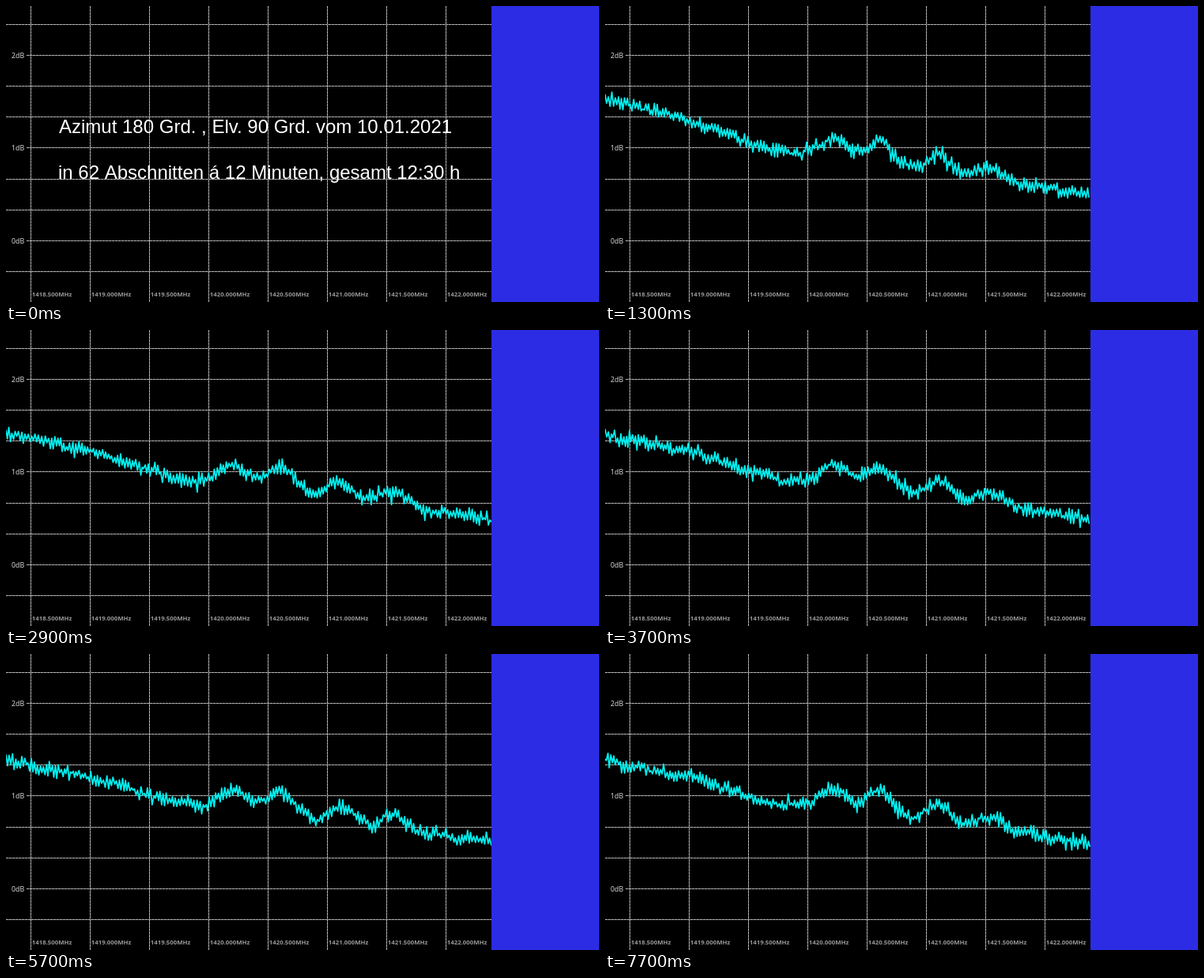
An HTML page with a canvas for the animation above (8 s loop, 750 by 375 pixels).

```html
<!DOCTYPE html>
<html lang="de">
<head>
<meta charset="utf-8">
<title>Spektrum</title>
<style>
html, body { margin: 0; width: 100%; height: 100%; overflow: hidden; background: #000; }
canvas { display: block; }
</style>
</head>
<body>
<canvas id="stage" width="750" height="375"></canvas>
<script>
const ctx = document.getElementById('stage').getContext('2d');
const LOOP = 8000, TITLE = 500, STEP = 400;
const W = 750, H = 375, PLOT_W = 614;
const SWEEPS = Math.ceil((LOOP - TITLE) / STEP);

function randomFrom(seed) {
  let s = seed;
  return () => {
    s = (s + 0x6D2B79F5) | 0;
    let t = Math.imul(s ^ (s >>> 15), 1 | s);
    t = (t + Math.imul(t ^ (t >>> 7), 61 | t)) ^ t;
    return ((t ^ (t >>> 14)) >>> 0) / 4294967296;
  };
}

const bell = (x, center, width) => Math.exp(-(((x - center) / width) ** 2) / 2);

// Falling noise floor with a broad sag and four emission peaks
function spectrum(x) {
  return 136 + x * 0.17
    + 15 * bell(x, 215, 55)
    - 18 * bell(x, 289, 16)
    - 22 * bell(x, 347, 13)
    + 6 * bell(x, 392, 12)
    - 17 * bell(x, 424, 15)
    + 5 * bell(x, 455, 10)
    - 15 * bell(x, 488, 15);
}

// The left edge swings up and down from sweep to sweep and settles
function swing(sweep, x) {
  const n = sweep - 2;
  return -20 * Math.exp(-n / 10 - x / 180) * Math.cos(n * Math.PI * 0.4);
}

function buildTrace(sweep) {
  const rnd = randomFrom(sweep * 977 + 41);
  const path = new Path2D();
  let drift = 0, side = 1;
  for (let x = 0; x <= PLOT_W; x += 1.6 + rnd() * 0.7) {
    drift = drift * 0.75 + (rnd() - 0.5) * 4;
    side = -side;
    const reach = rnd() < 0.08 ? 13 : 8.5;
    const y = spectrum(x) + swing(sweep, x) + drift + side * (1 + rnd() * reach);
    path.lineTo(x, y);
  }
  return path;
}

function gridLine(x0, y0, x1, y1) {
  ctx.beginPath();
  ctx.moveTo(x0, y0);
  ctx.lineTo(x1, y1);
  ctx.setLineDash([]);
  ctx.strokeStyle = '#6a6a6a';
  ctx.stroke();
  ctx.setLineDash([3, 1]);
  ctx.strokeStyle = '#b8b8b8';
  ctx.stroke();
}

function text(str, x, y, font, color) {
  ctx.font = font;
  ctx.fillStyle = color;
  ctx.fillText(str, x, y);
}

function drawGrid() {
  ctx.fillStyle = '#000';
  ctx.fillRect(0, 0, PLOT_W, H);
  ctx.lineWidth = 1;
  for (let i = 0; i < 9; i++) {
    const y = Math.round(23 + i * 39.1) + 0.5;
    const labelled = i % 3 === 1;
    gridLine(labelled ? 26 : 0, y, PLOT_W, y);
    if (labelled) text(2 - (i - 1) / 3 + 'dB', 7, y + 3.5, '500 8.8px "Noto Sans", sans-serif', '#d8d8d8');
  }
  for (let i = 0; i < 8; i++) {
    const x = 31.5 + i * 75;
    gridLine(x, 0, x, H);
    text((1418.5 + i / 2).toFixed(3) + 'MHz', x + 1.3, 368, '600 7.8px "Noto Sans", sans-serif', '#989898');
  }
  ctx.setLineDash([]);
}

function drawTitle() {
  const font = '24px "Liberation Sans", Arial, sans-serif';
  text('Azimut 180 Grd. , Elv. 90 Grd. vom 10.01.2021', 67, 161, font, '#fff');
  text('in 62 Abschnitten á 12 Minuten, gesamt 12:30 h', 66, 219, font, '#fff');
}

const traces = Array.from({ length: SWEEPS }, (_, i) => buildTrace(i));

function draw(t) {
  drawGrid();
  if (t < TITLE) {
    drawTitle();
  } else {
    ctx.strokeStyle = '#00f0f0';
    ctx.lineWidth = 1.8;
    ctx.lineJoin = 'round';
    ctx.stroke(traces[Math.floor((t - TITLE) / STEP)]);
  }
  ctx.fillStyle = '#2c2ce4';
  ctx.fillRect(PLOT_W, 0, W - PLOT_W, H);
}

const start = performance.now();
function tick() {
  draw((performance.now() - start) % LOOP);
  requestAnimationFrame(tick);
}
tick();
</script>
</body>
</html>
```
